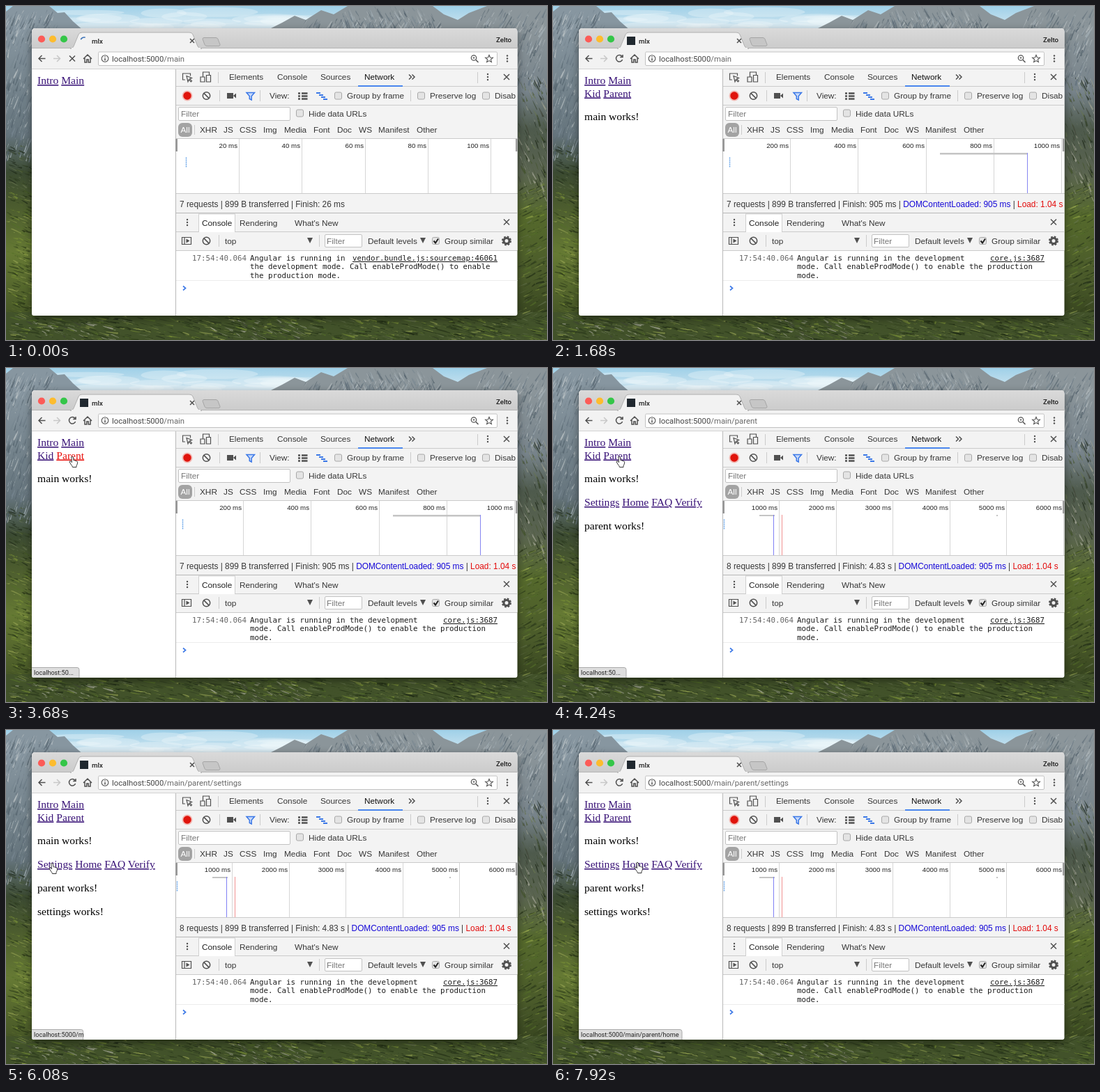
Write an HTML page that moves like this. It is 776x480 px and loops after 8 s.

```html
<!DOCTYPE html>
<html lang="en">
<head>
<meta charset="utf-8">
<title>Router demo</title>
<style>
html, body { margin: 0; width: 776px; height: 480px; overflow: hidden; background: #3a4a22; }
svg { display: block; }
text { white-space: pre; }
.ui { font: 11.8px "Liberation Sans", sans-serif; fill: #363636; }
.small { font: 9.7px "Liberation Sans", sans-serif; fill: #222; }
.page { font: 15.6px "Liberation Serif", serif; fill: #000; }
.mono { font: 10.8px "DejaVu Sans Mono", monospace; fill: #1c1c1c; }
.chrome { font: 500 9.7px Roboto, sans-serif; fill: #1c1c1c; }
.url { font: 11.3px Roboto, sans-serif; fill: #444; }
.status { font: 9.15px Roboto, sans-serif; fill: #222; }
.link { fill: #3a1478; text-decoration: underline; }
.icon { fill: none; stroke: #505050; stroke-width: 1.5; }
</style>
</head>
<body>
<svg id="stage" width="776" height="480" viewBox="0 0 776 480"></svg>
<script>
const STEP = 80, LOOP = 8000;

let seed = 11;
const rnd = () => (seed = seed * 16807 % 2147483647) / 2147483647;
const clamp = v => Math.max(0, Math.min(1, v));

const rect = (x, y, w, h, fill, more = '') =>
  `<rect x="${x}" y="${y}" width="${w}" height="${h}" fill="${fill}" ${more}/>`;
const path = (d, more = 'class="icon"') => `<path d="${d}" ${more}/>`;
const dot = (x, y, r, more) => `<circle cx="${x}" cy="${y}" r="${r}" ${more}/>`;
const text = (x, y, s, cls = 'ui', more = '') =>
  `<text x="${x}" y="${y}" class="${cls}" ${more}>${s}</text>`;
const hline = (y, x = 244, w = 489, c = '#cbcbcb') => rect(x, y, w, 1, c);
const vline = (x, y, h, c = '#cbcbcb') => rect(x, y, 1, h, c);
const dots = (x, y, gap = 4) =>
  [-gap, 0, gap].map(d => dot(x, y + d, 1.2, 'fill="#505050"')).join('');
const cross = (x, y, r) => path(`M${x - r} ${y - r}l${2 * r} ${2 * r}m0 ${-2 * r}l${-2 * r} ${2 * r}`);
const checkbox = (x, y) =>
  rect(x + .5, y + .5, 10, 10, '#e4e4e4', 'rx="2" stroke="#a8a8a8"');
const ban = (x, y) => dot(x, y, 5.2, 'class="icon"') + path(`M${x - 3.6} ${y - 3.6}l7.2 7.2`);
const arrowDown = (x, y) => path(`M${x - 4} ${y - 4}h8l-4 8z`, 'fill="#505050"');
const field = (x, y, w, h) => rect(x + .5, y + .5, w, h, '#fff', 'rx="1.5" stroke="#c2c2c2"');
const row = (y, items) => items.map(([x, s, more]) => text(x, y, s, 'ui', more)).join('');
const gradient = (id, stops) => `<linearGradient id="${id}" x2="0" y2="1">` +
  stops.map(([at, c]) => `<stop offset="${at}" stop-color="${c}"/>`).join('') + '</linearGradient>';

// Small slanted slivers: steep ones read as rock faces, flat ones as turf.
function slivers(x, y, w, h, n, dx, dy, colours) {
  let out = '';
  for (let i = 0; i < n; i++) {
    const px = x + rnd() * w, py = y + rnd() * h, k = .4 + rnd();
    const j = () => ((rnd() - .5) * 5).toFixed(1);
    out += path(`M${px.toFixed(1)} ${py.toFixed(1)}q${j()} ${j()} ${(dx * k).toFixed(1)} ${(dy * k).toFixed(1)}q${j()} ${j()} ${j()} ${j()}z`,
      `fill="${colours[i % colours.length]}" opacity=".6"`);
  }
  return out;
}

function wallpaper() {
  const stone = ['#4d5c66', '#a9b4ba', '#5d6d78', '#c3cacc', '#76868f'];
  const wood = ['#182212', '#42542a', '#29371c', '#687450'];
  const grass = ['#253315', '#7d9437', '#1d2811', '#55702a', '#9aa655'];
  const rock = ['#9a9c8c', '#3d4336', '#b8b8aa'];
  let clouds = '';
  for (let i = 0; i < 24; i++)
    clouds += `<ellipse cx="${100 + rnd() * 330}" cy="${8 + rnd() * 26}" rx="${25 + rnd() * 35}" ry="${3 + rnd() * 5}" fill="#eef5f8" opacity=".35"/>`;
  return '<defs>' + gradient('sky', [[0, '#9fd0e8'], [1, '#dcebf2']]) +
    gradient('leftSide', [[0, '#8796a0'], [.34, '#65747c'], [.46, '#3b4a32'], [.56, '#4a5a2e'], [.72, '#667a34'], [.9, '#4a5a28'], [1, '#37461f']]) +
    gradient('rightSide', [[0, '#8b959a'], [.2, '#77838a'], [.32, '#4e5a4c'], [.46, '#5a6450'], [.6, '#55692c'], [.8, '#4a5a2a'], [1, '#2c3819']]) + '</defs>' +
    rect(0, 0, 776, 40, 'url(#sky)') + clouds + rect(0, 34, 40, 446, 'url(#leftSide)') +
    rect(730, 34, 46, 446, 'url(#rightSide)') + rect(0, 440, 776, 40, '#42522a') +
    path('M0 36V8L10 0H62L74 10 84 9 96 22 112 36z', 'fill="#8796a0"') +
    path('M372 36L396 24 414 14 430 20 452 6 470 12 490 0H612L628 12 648 20 664 10 690 0H776V36z', 'fill="#8b959a"') +
    slivers(0, 6, 76, 30, 90, -6, 13, stone) + slivers(425, 18, 200, 18, 170, -7, 12, stone) +
    slivers(480, 0, 130, 28, 110, 6, 13, stone) + slivers(680, 2, 96, 34, 90, -7, 13, stone) +
    slivers(0, 34, 38, 180, 170, -5, 15, stone) + slivers(734, 34, 40, 70, 70, -5, 14, stone) +
    slivers(734, 100, 40, 170, 150, 5, 12, [...wood, ...rock]) + slivers(0, 200, 37, 80, 80, 9, 4, wood) +
    slivers(0, 265, 37, 180, 180, 11, 4, grass) + slivers(734, 260, 40, 190, 180, 11, -5, [...grass, ...wood]) +
    slivers(0, 446, 776, 34, 800, 14, 3, [...grass, ...wood]) +
    slivers(290, 450, 130, 28, 50, 11, 5, rock) + slivers(10, 452, 140, 26, 40, 11, 4, rock);
}

function browser() {
  const shape = 'M37 445V37q0-5 5-5H728.500q5 0 5 5V442q0 3-3 3H40q-3 0-3-3z';
  return path(shape, 'fill="#fff" style="filter:drop-shadow(0 4px 6px #0007)"') +
    `<clipPath id="win">${path(shape, '')}</clipPath><g clip-path="url(#win)">` +
    rect(37, 32, 697, 30, 'url(#strip)') + rect(37, 61, 697, 29, '#f2f2f2') + hline(60, 37, 697, '#b5b5b5') +
    path('M92 61q4 0 5-3l7-17q1-3 5-3H263q4 0 5 3l7 17q1 3 6 3z', 'fill="#f2f2f2" stroke="#b0b0b0"') +
    rect(94, 60, 185, 3, '#f2f2f2') +
    path('M284 45.500h17q2 0 3 2l3 8q0 2-2 2h-17q-2 0-3-2l-3-8q0-2 2-2z', 'fill="#c6c6c6" stroke="#a5a5a5"') +
    ['#fc5b57', '#fdbc2e', '#34c648'].map((c, i) => dot(51 + 16 * i, 47.5, 5.1, `fill="${c}"`)).join('') +
    text(123, 53.5, 'mlx', 'chrome') + text(725, 51.5, 'Zelto', 'chrome', 'text-anchor="end"') + cross(267, 50, 3) +
    path('M56.500 75.500H47m4.500-4.500L47 75.500l4.500 4.500') +
    path('M68 75.500h9.500m-4.500-4.500l4.500 4.500-4.500 4.500', 'fill="none" stroke="#c8c8c8" stroke-width="1.500"') +
    path('M111 76l6-6 6 6m-10-1v6h2.800v-4h2.400v4h2.800v-6') +
    field(132, 65.500, 572, 19.500) + dot(142, 75.500, 4.800, 'class="icon" style="stroke-width:1.100"') +
    path('M142 75v3.500m0-6v1.300') +
    dot(671, 74.500, 3.700, 'class="icon" style="stroke-width:1.200"') + path('M674 77.500l3.500 3.500') +
    path('M669.500 74.500h3m-1.500-1.500v3', 'stroke="#505050" stroke-width=".8"') +
    path('M693 70.500l1.500 3.500 3.900.3-3 2.500 1 3.800-3.400-2-3.400 2 1-3.800-3-2.500 3.900-.3z', 'class="icon" style="stroke-width:1.100"') +
    dots(719, 75.500) + hline(90, 37, 697, '#d2d2d2') + devtools() + '</g>';
}

function devtools() {
  return vline(243, 91, 355, '#b9b9b9') + rect(244, 91, 490, 100, '#f3f3f3') +
    // panel tabs
    path('M257 106h-3.500v-9h11v3.500m-5.500 0l7.500 3-3 1.200 3 3-1.200 1.200-3-3-1.300 3z', 'class="icon" style="stroke-width:1.200"') +
    path('M282.500 102v-7h9v4m-12.500 3h6v7h-6zm8.500-2.500h6v9.500h-6z', 'class="icon" style="stroke-width:1.200"') +
    vline(304, 95, 16) +
    row(106, [[320, 'Elements'], [389, 'Console'], [451, 'Sources'], [514, 'Network', 'style="fill:#111"']]) +
    path('M578 98.500l3.500 3.500-3.500 3.500m4.500-7l3.500 3.500-3.500 3.500') +
    vline(676, 95, 16) + dots(691, 102) + cross(718, 102, 4) + hline(115) + rect(505, 114, 64, 2, '#4a86ee') +
    // recording row
    dot(260, 129, 7.500, 'fill="#f3b9b4"') + dot(260, 129, 5.700, 'fill="#e0140c"') + ban(287.500, 129) + vline(306, 121, 16) +
    path('M317 125h9v8h-9zm9 4l4-3.500v7z', 'fill="#505050"') +
    path('M345 124.500h11.500l-4.300 5v5.500l-2.900-1.500v-4z', 'fill="#c8dafa" stroke="#3b78e7" stroke-width="1.500"') + vline(364, 121, 16) +
    path('M419 125.500h3m2 0h8.500m-13.500 4h3m2 0h8.500m-13.500 4h3m2 0h8.500', 'stroke="#505050" stroke-width="2.400"') +
    path('M445 125h6m-2 3h6m-3 3h6m-3 3h6', 'stroke="#3b78e7" stroke-width="1.800"') +
    checkbox(471, 123.500) + vline(580, 121, 16) + checkbox(590, 123.500) + checkbox(683, 123.500) +
    row(133, [[378, 'View:'], [489, 'Group by frame'], [608, 'Preserve log'], [701, 'Disab']]) + hline(142) +
    // filter rows
    field(247, 145, 160, 19) + checkbox(416, 148.500) +
    row(159, [[251, 'Filter', 'style="fill:#777"'], [434, 'Hide data URLs']]) +
    rect(247, 168, 20, 20, '#a3a3a3', 'rx="6"') + vline(270, 171, 14) +
    row(182, [[250.500, 'All', 'style="fill:#fff"'], [278, 'XHR'], [312, 'JS'], [335, 'CSS'], [369, 'Img'], [399, 'Media'],
      [441, 'Font'], [475, 'Doc'], [506, 'WS'], [534, 'Manifest'], [589, 'Other']]) + hline(190) +
    // summary and drawer
    rect(244, 270, 490, 81, '#f3f3f3') + hline(269) + hline(297, 244, 490, '#b8b8b8') +
    dots(260, 311) + rect(276.500, 299, 52, 25, '#fff', 'stroke="#d0d0d0"') + hline(324) + rect(277, 323, 51, 2, '#fff') +
    row(315.500, [[281, 'Console', 'style="fill:#222"'], [335, 'Rendering'], [414, "What's New"]]) + cross(718, 310.500, 4) +
    path('M252.500 332.500h13v10h-13zm3.500 0v10', 'class="icon" style="stroke-width:1.200"') +
    path('M258.500 334.500l5 3-5 3z', 'fill="#505050"') + ban(287.500, 337.500) + vline(305, 329, 17) +
    arrowDown(436, 337) + vline(449, 329, 17) + field(457, 328, 53, 18) + arrowDown(598, 337) +
    checkbox(611, 332) + path('M613.500 337.500l2.500 3 4-6', 'class="icon" style="stroke:#222;stroke-width:2"') +
    row(341.500, [[314, 'top'], [460, 'Filter', 'style="fill:#777"'], [519, 'Default levels'], [629, 'Group similar']]) +
    dot(718, 337.500, 4, 'fill="none" stroke="#505050" stroke-width="3"') +
    dot(718, 337.500, 6, 'fill="none" stroke="#505050" stroke-width="2" stroke-dasharray="2.700 2.010"') +
    hline(351) + hline(394, 244, 490, '#ececec') +
    text(267, 366, '17:54:40.064', 'mono', 'style="fill:#666"') +
    path('M254 402.500l3.500 3-3.500 3', 'fill="none" stroke="#3b78e7" stroke-width="1.700"');
}

function overview(phase) {
  const [unit, first, gap, reqX] = [[20, 334, 90.3, 258], [200, 340, 97.3, 253], [1000, 324, 81.5, 245]][phase];
  let out = rect(244, 191, 490, 78, '#fff');
  for (let i = 0; first + i * gap < 734; i++) {
    const x = Math.round(first + i * gap);
    out += vline(x, 191, 78, '#d6d6d6') + text(x - 2, 204, `${unit * (i + 1)} ms`, 'small', 'text-anchor="end"');
  }
  out += path(`M${reqX + .5} 217.500v14`, 'stroke="#6aa5ea" stroke-width="1.500" stroke-dasharray="2 1"');
  if (phase == 1) out += rect(555, 211, 126, 2.5, '#c4c4c4') + vline(680, 211, 58, '#8585f0');
  if (phase == 2) out += rect(296, 211, 22, 2, '#c4c4c4') + vline(316, 211, 58, '#8080f5') +
    vline(328, 211, 58, '#f29292') + rect(636, 211, 2, 2, '#c4c4c4');
  return out + rect(243, 191, 3, 18, '#9a9a9a') + rect(731, 191, 3, 18, '#9a9a9a');
}

const summary = phase => text(249, 288.5,
  `${phase == 2 ? 8 : 7} requests | 899 B transferred | Finish: ${['26 ms', '905 ms', '4.83 s'][phase]}` +
  (phase ? ' | <tspan fill="#1508d8">DOMContentLoaded: 905 ms</tspan> | <tspan fill="#e30b0b">Load: 1.04 s</tspan>' : ''),
  'ui', 'style="font-size:11.87px"');

function consoleLog(mapped) {
  const lines = mapped
    ? ['Angular is running in the development', 'mode. Call enableProdMode() to enable the production', 'mode.']
    : ['Angular is running in', 'the development mode. Call enableProdMode() to enable', 'the production mode.'];
  return lines.map((s, i) => text(350, 366 + 12.4 * i, s, 'mono')).join('') +
    text(705, 366, mapped ? 'core.js:3687' : 'vendor.bundle.js:sourcemap:46061', 'mono', 'text-anchor="end" text-decoration="underline"');
}

const links = (y, names, active) => text(45, y, names.map(n =>
  `<tspan class="link" ${n == active ? 'style="fill:#e8110d"' : ''}>${n}</tspan>`).join(' '), 'page');

// Link preview in the lower left corner: narrow first, then widening.
function preview(t) {
  const host = 'localhost:5000/main/parent';
  const [url, full, grow] = t < 5200 ? [host, 122, 4400] : t < 6640 ? [host + '/settings', 159, 6070] : [host + '/home', 148, 0];
  if (t < 2880) return '';
  const w = 68 + (full - 68) * clamp((t - grow) / 160);
  return `<svg x="37" y="430" width="${w + 1}" height="15">` +
    path(`M-1 .5H${w - 3}q3 0 3 3V16H-1z`, 'fill="#dedede" stroke="#a9a9a9"') +
    text(3, 11, t < grow ? 'localhost:50...' : url, 'status') + '</svg>';
}

const track = [[2480, 117, 116], [2640, 113, 118], [2960, 95, 127], [4480, 95, 127], [5120, 70, 184],
  [5280, 66, 191], [6320, 66, 191], [6880, 121, 190], [8000, 121, 190]];

function pointer(t) {
  const i = track.findIndex(k => k[0] > t);
  if (i < 1) return '';
  const [t0, x0, y0] = track[i - 1], [t1, x1, y1] = track[i];
  const p = (t - t0) / (t1 - t0), e = p * p * (3 - 2 * p);
  const hand = t >= 2800 && t < 4640 || t >= 5200;
  const d = hand
    ? 'M-1.200 1q1-2 2.400 0l1 5q1.300-1 2 .4 1.300-.6 1.900.7 1.500-.3 1.500 1.400 0 3-1.600 5v2H.5q-.5-2-2-3.500l-2.500-4q0-1.800 2-.8l1.500 1.500z'
    : 'M0 0v11.200l2.600-2.400 1.800 4 1.900-.8-1.700-3.900h3.500z';
  return path(d, `transform="translate(${x0 + (x1 - x0) * e} ${y0 + (y1 - y0) * e})" ` +
    (hand ? 'fill="#fff" stroke="#222" stroke-width=".9"' : 'fill="#000" stroke="#fff" stroke-width=".9" paint-order="stroke"'));
}

function live(t) {
  const loaded = t >= 160, parent = t >= 3840, settings = t >= 5760;
  const phase = parent ? 2 : loaded ? 1 : 0;
  const active = t >= 3600 && t < 3840 ? 'Parent' : t >= 5600 && t < 5760 ? 'Settings' : '';
  let out = text(152, 79.5, 'localhost:5000' + `<tspan fill="#666">/main${parent ? '/parent' : ''}${settings ? '/settings' : ''}</tspan>`, 'url');
  out += loaded
    ? rect(106, 44, 12, 12, '#20282f') + path('M99 72.500a4.700 4.700 0 1 0 .6 4.500m.4-7v3.500h-3.800')
    : path('M112 45a5 5 0 0 1 5 5', `fill="none" stroke="#3f74b8" stroke-width="1.600" transform="rotate(${t * .6 - 70} 112 50)"`) + cross(95, 75.5, 4);
  out += links(112, ['Intro', 'Main']);
  if (loaded) out += links(130.5, ['Kid', 'Parent'], active) + text(45, 164, 'main works!', 'page');
  if (parent) out += links(198, ['Settings', 'Home', 'FAQ', 'Verify'], active) + text(45, 232, 'parent works!', 'page');
  if (settings) out += text(45, 265.5, 'settings works!', 'page');
  return out + overview(phase) + summary(phase) + consoleLog(t >= 240) + preview(t) + pointer(t);
}

const stage = document.getElementById('stage');
stage.innerHTML = '<defs>' + gradient('strip', [[0, '#dadada'], [1, '#cbcbcb']]) + '</defs>' +
  wallpaper() + browser() + '<g id="live" clip-path="url(#win)"></g>';
const layer = document.getElementById('live');
let shown = -1;

function tick() {
  const t = Math.floor(performance.now() % LOOP / STEP) * STEP;
  if (t != shown) layer.innerHTML = live(shown = t);
  requestAnimationFrame(tick);
}
tick();
</script>
</body>
</html>
```
